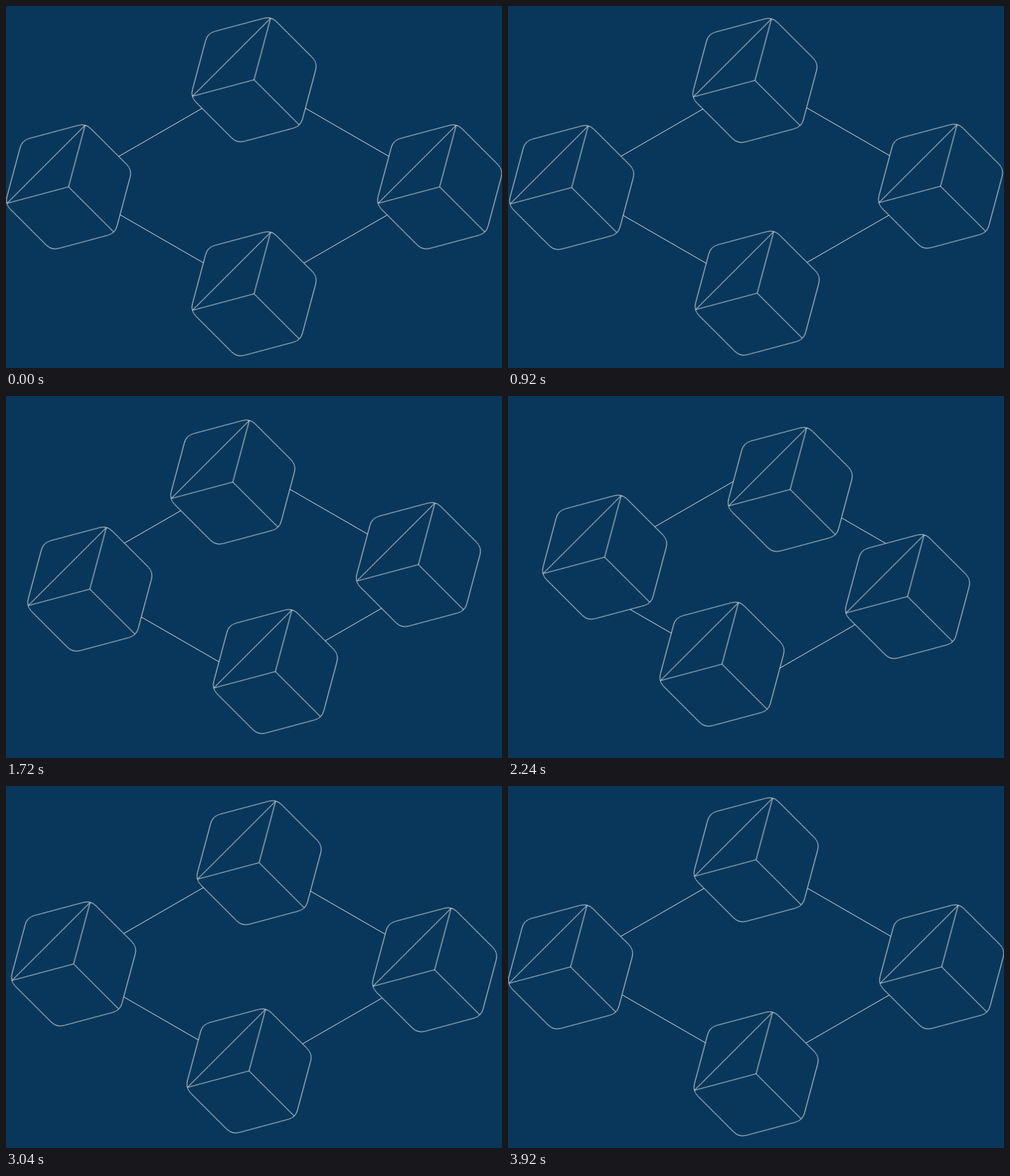
An HTML page that plays this animation: 720 px wide and 526 px high, repeating every 3.96 s.

```html
<!DOCTYPE html>
<html lang="en">
<head>
<meta charset="utf-8">
<title>Orbiting cubes</title>
<style>
  html, body {
    margin: 0;
    width: 100%;
    height: 100%;
    overflow: hidden;
    background: #09375b;
  }
  svg {
    display: block;
    width: 720px;
    height: 526px;
    fill: #09375b;
    stroke: #d5dade;
    stroke-width: 1;
    --n: translate(360.1px, 107.2px);
    --e: translate(629.5px, 262.8px);
    --s: translate(360.1px, 418.2px);
    --w: translate(90.8px, 262.8px);
  }
  .cube { animation: orbit 3960ms ease-in-out infinite; }
  .top    { --a: var(--n); --b: var(--e); --c: var(--s); --d: var(--w); }
  .right  { --a: var(--e); --b: var(--s); --c: var(--w); --d: var(--n); }
  .bottom { --a: var(--s); --b: var(--w); --c: var(--n); --d: var(--e); }
  .left   { --a: var(--w); --b: var(--n); --c: var(--e); --d: var(--s); }

  /* four equal steps, then a brief rest before the loop closes */
  @keyframes orbit {
    0%, 98.55%, 100% { transform: var(--a); }
    24.64% { transform: var(--b); }
    49.27% { transform: var(--c); }
    73.91% { transform: var(--d); }
  }
</style>
</head>
<body>
<svg viewBox="0 0 720 526">
  <defs>
    <g id="cube" transform="rotate(15)">
      <path d="M9.5-90 L73.2-53.24 A19 19 0 0 1 82.7-36.78 V36.78
               A19 19 0 0 1 73.2 53.24 L9.5 90 A19 19 0 0 1-9.5 90
               L-73.2 53.24 A19 19 0 0 1-82.7 36.78 V-36.78
               A19 19 0 0 1-73.2-53.24 L-9.5-90 A19 19 0 0 1 9.5-90 Z"/>
      <path fill="none" d="M80.16 46.28 L0 0 V-92.56 L-80.16 46.28 L0 0"/>
    </g>
  </defs>

  <path d="M361.8 106.5 L622.4 256.9 A4 4 0 0 1 622.4 263.9
           L361.8 414.3 A4 4 0 0 1 357.8 414.3
           L97.2 263.9 A4 4 0 0 1 97.2 256.9
           L357.8 106.5 A4 4 0 0 1 361.8 106.5 Z"/>

  <g class="cube top"><use href="#cube"/></g>
  <g class="cube right"><use href="#cube"/></g>
  <g class="cube bottom"><use href="#cube"/></g>
  <g class="cube left"><use href="#cube"/></g>
</svg>
</body>
</html>
```
